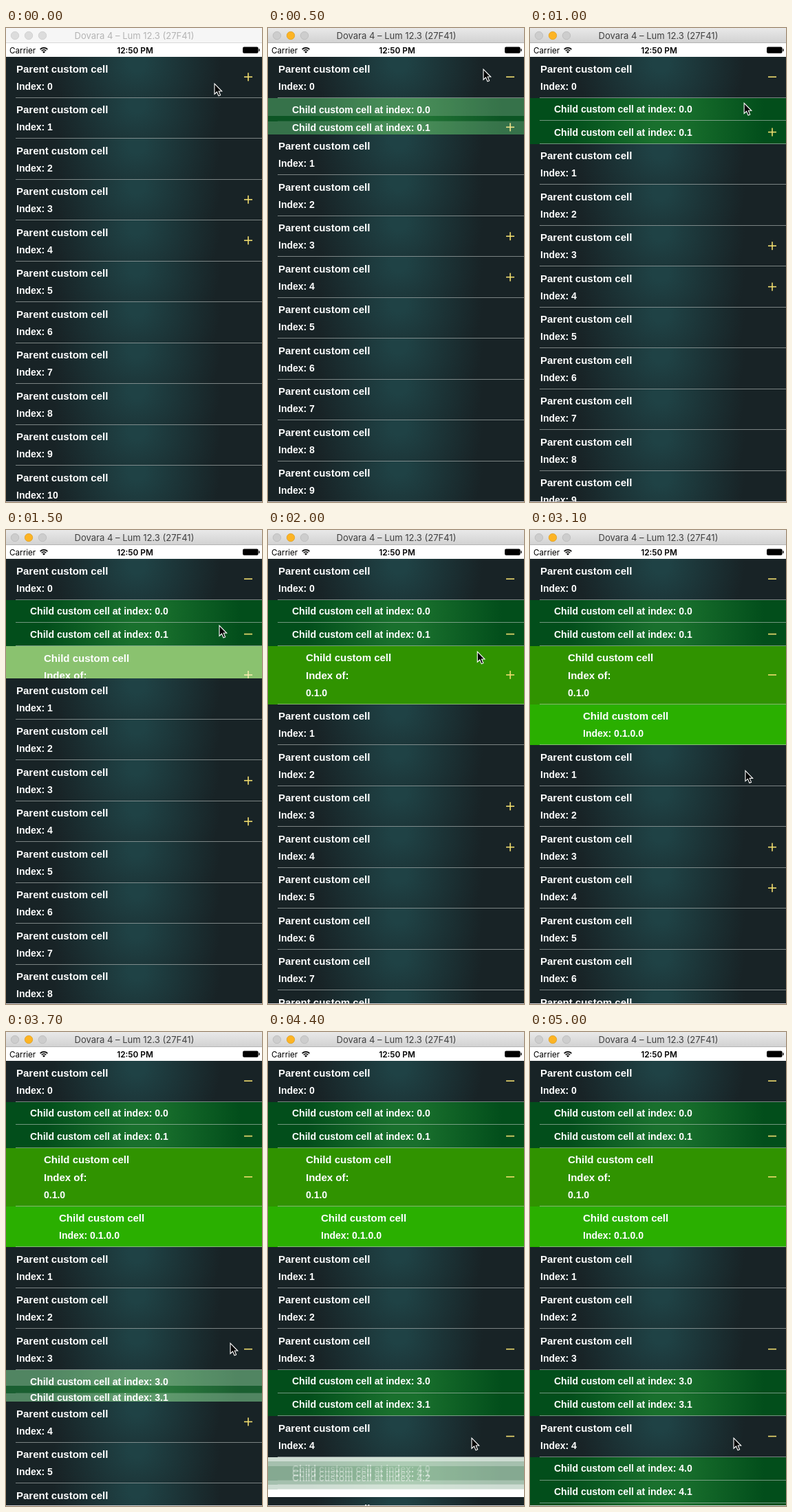
Animation of 372x690 px, one loop 5100 ms. Source, as an HTML page with a canvas:

```html
<!DOCTYPE html>
<html lang="en">
<head>
<meta charset="utf-8">
<title>Expandable table</title>
<style>
  html, body { margin: 0; width: 100%; height: 100%; overflow: hidden; background: #fff; }
  canvas { display: block; }
</style>
</head>
<body>
<canvas id="stage" width="372" height="690"></canvas>
<script>
const W = 372, TOP = 42, BOTTOM = 689;
const LOOP = 5100, STEP = 100, SLIDE = 300;
const UI = 'Inter, sans-serif';
const CELL = '"Liberation Sans", Arial, sans-serif';
const ctx = document.getElementById('stage').getContext('2d');
const scratch = document.createElement('canvas');
scratch.width = W;
scratch.height = 90;
const cellCtx = scratch.getContext('2d');

// Start time of each expansion, in ms
const taps = [288, 1338, 2428, 3512, 4316];
const ACTIVATE = 200;

// Cursor moves: from time, to time, x, y
const moves = [
  [0, 0, 303, 81],
  [0, 280, 313, 60],
  [650, 1250, 310, 139],
  [1700, 2350, 297, 225],
  [2700, 3450, 326, 453],
  [3750, 4280, 296, 591]
];

// Text lines: x, baseline, font size, content
const kinds = {
  parent: {
    h: 59.5, glow: ['#1f4245', '#182326'], cx: 190, cy: 0.15, r: 122, core: 0.1,
    lines: id => [[15, 22.5, 15, 'Parent custom cell'], [15, 47.5, 14, 'Index: ' + id]]
  },
  child: {
    h: 33.7, glow: ['#19702d', '#024e1b'], cx: 198, cy: 0.5, r: 142, core: 0.15,
    lines: id => [[35, 21.5, 14, 'Child custom cell at index: ' + id]]
  },
  tall: {
    h: 85, fill: '#309300',
    lines: id => [[55, 22.5, 15, 'Child custom cell'], [55, 48, 15, 'Index of:'], [55, 73, 14, id]]
  },
  leaf: {
    h: 59.5, fill: '#2aaf00',
    lines: id => [[77, 22.5, 15, 'Child custom cell'], [77, 47.5, 14, 'Index: ' + id]]
  }
};

const row = (kind, id, addedBy, opens) => ({ kind: kinds[kind], id: String(id), addedBy, opens });
const none = undefined;
const rows = [
  row('parent', 0, none, 0),
  row('child', '0.0', 0),
  row('child', '0.1', 0, 1),
  row('tall', '0.1.0', 1, 2),
  row('leaf', '0.1.0.0', 2),
  row('parent', 1),
  row('parent', 2),
  row('parent', 3, none, 3),
  row('child', '3.0', 3),
  row('child', '3.1', 3),
  row('parent', 4, none, 4)
];
for (let i = 0; i < 9; i++) rows.push(row('child', '4.' + i, 4));
for (let i = 5; i < 11; i++) rows.push(row('parent', i));

const clamp = v => Math.min(1, Math.max(0, v));
const ease = v => { v = clamp(v); return v * v * (3 - 2 * v); };

function text(c, str, x, y, font, color, align = 'left') {
  c.font = font;
  c.fillStyle = color;
  c.textAlign = align;
  c.fillText(str, x, y);
}

function paintCell(c, { kind, id, opens }, y, t) {
  const { h, fill, glow, cx, cy, r, core } = kind;
  if (glow) {
    const g = c.createRadialGradient(cx, y + h * cy, 0, cx, y + h * cy, r);
    g.addColorStop(core, glow[0]);
    g.addColorStop(1, glow[1]);
    c.fillStyle = g;
  } else {
    c.fillStyle = fill;
  }
  const top = Math.round(y), bottom = Math.round(y + h);
  c.fillRect(0, top, W, bottom - top);
  c.fillStyle = 'rgba(205,210,208,.55)';
  c.fillRect(14, bottom - 1, W - 14, 1);

  for (const [x, base, size, str] of kind.lines(id)) {
    text(c, str, x, y + base, `bold ${size}px ${CELL}`, '#fff');
  }
  if (opens !== undefined) {
    const mid = y + h / 2 - 0.5;
    c.fillStyle = '#f0dc6e';
    c.fillRect(346, mid - 0.8, 12, 1.6);
    if (t < taps[opens]) c.fillRect(351.2, mid - 6, 1.6, 12);
  }
}

function paintFaded(item, y, alpha, t) {
  cellCtx.clearRect(0, 0, W, 90);
  paintCell(cellCtx, item, 0, t);
  ctx.globalAlpha = alpha;
  ctx.drawImage(scratch, 0, Math.round(y));
  ctx.globalAlpha = 1;
}

function paintTable(t) {
  ctx.save();
  ctx.beginPath();
  ctx.rect(0, TOP, W, BOTTOM - TOP);
  ctx.clip();
  const solid = [];
  let y = TOP, restY = TOP;
  for (const item of rows) {
    const added = item.addedBy !== undefined;
    const p = added ? ease((t - taps[item.addedBy]) / SLIDE) : 1;
    if (p === 0) continue;
    const shown = y < BOTTOM && (!added || restY < BOTTOM);
    if (shown && p < 1) paintFaded(item, y, p, t);
    else if (shown) solid.push([item, y]);
    y += item.kind.h * p;
    restY += item.kind.h;
  }
  // Settled rows lie above the ones being inserted
  for (const [item, top] of solid) paintCell(ctx, item, top, t);
  ctx.restore();
}

function paintTitle(active) {
  const g = ctx.createLinearGradient(0, 0, 0, 22);
  g.addColorStop(0, active ? '#e9e9e9' : '#f6f6f6');
  g.addColorStop(1, active ? '#d1d1d1' : '#f6f6f6');
  ctx.fillStyle = g;
  ctx.fillRect(0, 0, W, 22);
  ctx.fillStyle = active ? '#b4b4b4' : '#d8d8d8';
  ctx.fillRect(0, 21, W, 1);
  [13, 33, 53].forEach((x, i) => {
    const lit = active && i === 1;
    ctx.beginPath();
    ctx.arc(x, 11, 5.7, 0, Math.PI * 2);
    ctx.fillStyle = lit ? '#fdb424' : active ? '#cdcdcd' : '#dcdcdc';
    ctx.fill();
    ctx.lineWidth = 0.8;
    ctx.strokeStyle = lit ? '#dfa023' : active ? '#b9b9b9' : '#cccccc';
    ctx.stroke();
  });
  text(ctx, 'Dovara 4 – Lum 12.3 (27F41)', 186.5, 16, `13px ${UI}`, active ? '#404040' : '#b4b4b4', 'center');
}

function paintStatus() {
  text(ctx, 'Carrier', 5, 36.5, `11.7px ${UI}`, '#000');
  text(ctx, '12:50 PM', 187.5, 36.5, `600 11.8px ${UI}`, '#000', 'center');

  ctx.strokeStyle = ctx.fillStyle = '#000';
  ctx.lineWidth = 1.6;
  for (const r of [4.6, 7.6]) {
    ctx.beginPath();
    ctx.arc(55, 36.5, r, -Math.PI * 0.75, -Math.PI * 0.25);
    ctx.stroke();
  }
  ctx.beginPath();
  ctx.moveTo(55, 36.8);
  ctx.arc(55, 36.8, 2.8, -Math.PI * 0.75, -Math.PI * 0.25);
  ctx.fill();

  ctx.beginPath();
  ctx.roundRect(344, 27.4, 22.6, 9.4, 2);
  ctx.fill();
  ctx.fillRect(367.3, 30.4, 1.4, 3.4);
}

function paintCursor(t) {
  let x = 0, y = 0;
  for (const [from, to, nx, ny] of moves) {
    const p = to > from ? ease((t - from) / (to - from)) : 1;
    x += (nx - x) * p;
    y += (ny - y) * p;
  }
  const arrow = new Path2D('M0 0V15.2L3.5 12L6 17.8L8.6 16.7L6.2 11H10.7Z');
  ctx.save();
  ctx.translate(x, y);
  ctx.fillStyle = '#000';
  ctx.fill(arrow);
  ctx.lineWidth = 1.1;
  ctx.strokeStyle = '#fff';
  ctx.stroke(arrow);
  ctx.restore();
}

function draw(t) {
  ctx.fillStyle = '#fff';
  ctx.fillRect(0, 0, W, 690);
  paintTable(t);
  paintTitle(t >= ACTIVATE);
  paintStatus();
  ctx.fillStyle = '#d8d2d5';
  ctx.fillRect(0, BOTTOM, W, 1);
  paintCursor(t);
}

const begin = performance.now();
function tick() {
  const t = (performance.now() - begin) % LOOP;
  draw(Math.floor(t / STEP) * STEP);
  requestAnimationFrame(tick);
}
tick();
</script>
</body>
</html>
```
